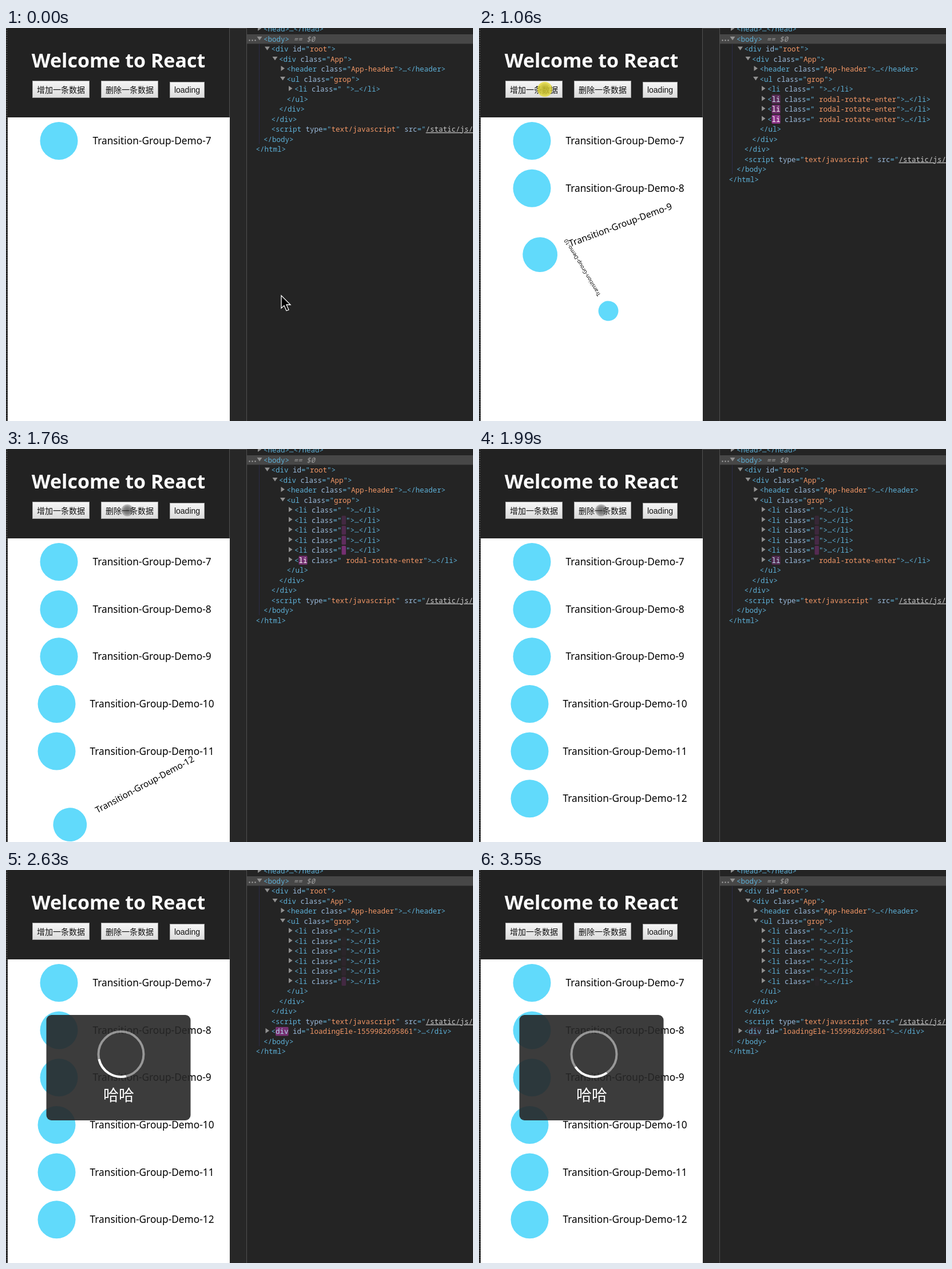
Recreate the animation shown at these times as an HTML page. Size 816 by 686 pixels, loop 3.63 s.

```html
<!DOCTYPE html>
<html lang="zh">
<head>
<meta charset="utf-8">
<style>
  html, body { margin: 0; width: 100%; height: 100%; overflow: hidden; background: #242424; }
  svg { display: block; }
  text { white-space: pre; }
  .title { font: bold 34px "Noto Sans", sans-serif; fill: #fff; text-anchor: middle; }
  .btn { font: 14px "Liberation Sans", "Noto Sans CJK SC", sans-serif; fill: #111; text-anchor: middle; }
  .item { font: 17.3px "Noto Sans", sans-serif; fill: #000; text-anchor: middle; }
  .msg { font: 27px "Noto Sans CJK SC", sans-serif; fill: #fff; text-anchor: middle; }
  .code { font: 12.5px "Noto Sans Mono", monospace; fill: #5db0d7; }
  .name { fill: #9bbbdc; }
  .val { fill: #f29766; }
  .link { fill: #c8c8c8; text-decoration: underline; }
  .dim { fill: #a0a0a0; font-style: italic; }
</style>
</head>
<body>
<svg width="816" height="686" viewBox="0 0 816 686">
  <defs>
    <linearGradient id="face" x1="0" y1="0" x2="0" y2="1">
      <stop offset="0" stop-color="#f6f6f6"/><stop offset="1" stop-color="#dcdcdc"/>
    </linearGradient>
    <radialGradient id="touchFill">
      <stop offset="0" stop-color="#333" stop-opacity=".7"/>
      <stop offset=".6" stop-color="#444" stop-opacity=".6"/>
      <stop offset="1" stop-color="#555" stop-opacity=".3"/>
    </radialGradient>
    <clipPath id="page"><rect x="3" y="0" width="388" height="686"/></clipPath>
  </defs>
  <rect width="816" height="686" fill="#242424"/>
  <rect x="390" width="30" height="686" fill="#272727"/>
  <path d="M390 .5H420" stroke="#4c4c4c"/>
  <path d="M390.5 0V156M420.5 0V686" stroke="#505050"/>
  <path d="M1.5 0V686" stroke="#8a8a8a" stroke-dasharray="1 3"/>
  <rect x="3" width="387" height="156" fill="#222"/>
  <rect x="3" y="156" width="388" height="530" fill="#fff"/>
  <text class="title" x="196.5" y="69">Welcome to React</text>
  <g id="buttons"></g>
  <g id="list" clip-path="url(#page)"></g>
  <g id="tree"></g>
  <g id="popup">
    <rect x="70.5" y="253" width="252" height="184" rx="9" fill="#272727" fill-opacity=".9"/>
    <g fill="none" stroke="#fff" stroke-width="4">
      <circle cx="201" cy="321.5" r="39.5" stroke-opacity=".47"/>
      <path id="arc" d="M228.93 293.57A39.5 39.5 0 0 1 228.93 349.43"/>
    </g>
    <text class="msg" x="197" y="402.5">哈哈</text>
  </g>
  <g id="cursor">
    <circle id="touch" r="10.5" fill="url(#touchFill)"/>
    <circle id="press" r="13" fill="#e3d82a" fill-opacity=".75"/>
    <path id="arrow" d="M0 0V22L5 17.5L9 26.5L13 24.8L9 16H16Z" fill="#000" stroke="#fff" stroke-width="1.3"/>
  </g>
</svg>
<script>
const LOOP = 3630, ENTER = 360, CLASS_TIME = 450, POPUP = 2450, PRESS = 90;
const CENTER = 196.5, CHAR = 7.5;
const $ = id => document.getElementById(id);
const clamp = v => Math.max(0, Math.min(1, v));
const mix = (a, b, k) => `rgb(${a.map((v, i) => Math.round(v + (b[i] - v) * k))})`;
const show = (el, on) => el.setAttribute('visibility', on ? 'visible' : 'hidden');

// CSS "ease": cubic-bezier(.25, .1, .25, 1)
function ease(x) {
  const bez = (u, a, b) => 3 * u * (1 - u) ** 2 * a + 3 * u * u * (1 - u) * b + u ** 3;
  let lo = 0, hi = 1;
  for (let i = 0; i < 24; i++) {
    const mid = (lo + hi) / 2;
    if (bez(mid, .25, .25) < x) lo = mid; else hi = mid;
  }
  return x <= 0 ? 0 : x >= 1 ? 1 : bez(lo, .1, 1);
}

$('buttons').innerHTML = [[46, 92, 100, '增加一条数据'], [166, 92, 100, '删除一条数据'], [286, 94, 61, 'loading']]
  .map(([x, y, w, label]) =>
    `<rect x="${x + .5}" y="${y + .5}" width="${w - 1}" height="${121 - y}" fill="url(#face)" stroke="#a6a6a6"/>
     <text class="btn" x="${x + w / 2}" y="112.5">${label}</text>`).join('');

const items = [-1e6, 700, 844, 984, 1128, 1565].map((start, i) => {
  const n = 7 + i, el = document.createElementNS('http://www.w3.org/2000/svg', 'g');
  el.innerHTML = `<circle cx="${n > 9 ? -108 : -104}" r="33" fill="#61dafb"/>
    <text class="item" x="58.5" y="6">Transition-Group-Demo-${n}</text>`;
  $('list').append(el);
  return { start, el, y: 197 + 82.65 * i };
});

function drawItems(t) {
  for (const { start, el, y } of items) {
    const p = ease((t - start) / ENTER);
    show(el, t >= start);
    el.setAttribute('transform', `translate(${CENTER} ${y}) rotate(${-180 * (1 - p)}) scale(${.3 + .7 * p})`);
  }
}

const attr = (name, val) => ` <tspan class="name">${name}</tspan>="<tspan class="val">${val}</tspan>"`;
const glow = age => age < 0 ? 0 : Math.exp(-age / 450);

function drawTree(t) {
  let out = '', row = -1;
  const add = (depth, html, { open, mark, from, len } = {}) => {
    const x = 436.5 + 13.5 * depth, y = 19.5 + 17.5 * row++;
    const ax = x - 7, k = mark || 0;
    if (open !== undefined) {
      const d = open ? `M${ax - 4.5} ${y - 4.5}h9l-4.5 6.5z` : `M${ax - 3} ${y - 6}v9l6.5 -4.5z`;
      out += `<path d="${d}" fill="#919191"/>`;
    }
    if (k > .03) {
      out += `<rect x="${x + from * CHAR}" y="${y - 8}" width="${len * CHAR}" height="15.5" rx="1.5"
        fill="${mix([36, 36, 36], [158, 54, 153], k)}"/>`;
    }
    out += `<text class="code" x="${x}" y="${y + 4.2}">${html}</text>`;
  };
  const tag = (name, attrs = '', k = 0) =>
    `&lt;<tspan fill="${mix([93, 176, 215], [255, 255, 255], clamp(k * 1.6))}">${name}</tspan>${attrs}&gt;`;
  const end = name => `&lt;/${name}&gt;`;
  const fold = (name, attrs, k) => tag(name, attrs, k) + '…' + end(name);

  out += '<rect x="421" y="11" width="395" height="16.5" fill="#474747"/>';
  out += '<path d="M424.5 21.5h12" stroke="#b0b0b0" stroke-width="2" stroke-dasharray="2 3"/>';
  add(1, fold('head'), { open: false });
  add(1, tag('body') + ' <tspan class="dim">== $0</tspan>', { open: true });
  add(2, tag('div', attr('id', 'root')), { open: true });
  add(3, tag('div', attr('class', 'App')), { open: true });
  add(4, fold('header', attr('class', 'App-header')), { open: false });
  add(4, tag('ul', attr('class', 'grop')), { open: true });
  for (const { start } of items) {
    const age = t - start;
    if (age < 0) continue;
    const entering = age < CLASS_TIME;
    const mark = glow(entering ? age : age - CLASS_TIME);
    add(5, fold('li', attr('class', entering ? ' rodal-rotate-enter' : ' '), entering ? mark : 0),
      { open: false, mark, from: entering ? 1 : 11, len: entering ? 2 : 1 });
  }
  add(4, end('ul'));
  add(3, end('div'));
  add(2, end('div'));
  add(2, '&lt;script' + attr('type', 'text/javascript') +
    ' <tspan class="name">src</tspan>="<tspan class="link">/static/js/bundle.js</tspan>');
  if (t >= POPUP) {
    const mark = glow(t - POPUP);
    add(2, fold('div', attr('id', 'loadingEle-1559982695861'), mark * .5),
      { open: false, mark, from: 1, len: 3 });
  }
  out += `<path d="M442.5 28V${19.5 + 17.5 * row + 8}" stroke="#2c2c48"/>`;
  add(1, end('body'));
  add(0, end('html'));
  $('tree').innerHTML = out;
}

// time, x, y
const path = [[70, 481, 467], [490, 114, 105], [700, 115, 107], [1620, 115, 107], [1750, 212, 107],
  [1980, 213, 107], [2250, 317, 109], [2480, 317, 109], [2660, 322, -20]];
const clicks = [...items.slice(1).map(i => i.start), POPUP - 10];

function drawCursor(t) {
  const i = path.findIndex(p => p[0] > t);
  let [, x, y] = path[i < 0 ? path.length - 1 : Math.max(0, i - 1)];
  if (i > 0) {
    const [t0] = path[i - 1], [t1, x1, y1] = path[i];
    const u = (t - t0) / (t1 - t0), k = u * u * (3 - 2 * u);
    x += (x1 - x) * k;
    y += (y1 - y) * k;
  }
  $('cursor').setAttribute('transform', `translate(${x} ${y})`);
  show($('arrow'), x > 390);
  show($('touch'), x <= 390);
  show($('press'), clicks.some(c => t >= c - PRESS && t < c));
}

function draw(t) {
  drawItems(t);
  drawTree(t);
  drawCursor(t);
  show($('popup'), t >= POPUP);
  $('arc').setAttribute('transform', `rotate(${50 + (t - 3010) * 410 / 540} 201 321.5)`);
}

function tick() {
  draw(performance.now() % LOOP);
  requestAnimationFrame(tick);
}
tick();
</script>
</body>
</html>
```
